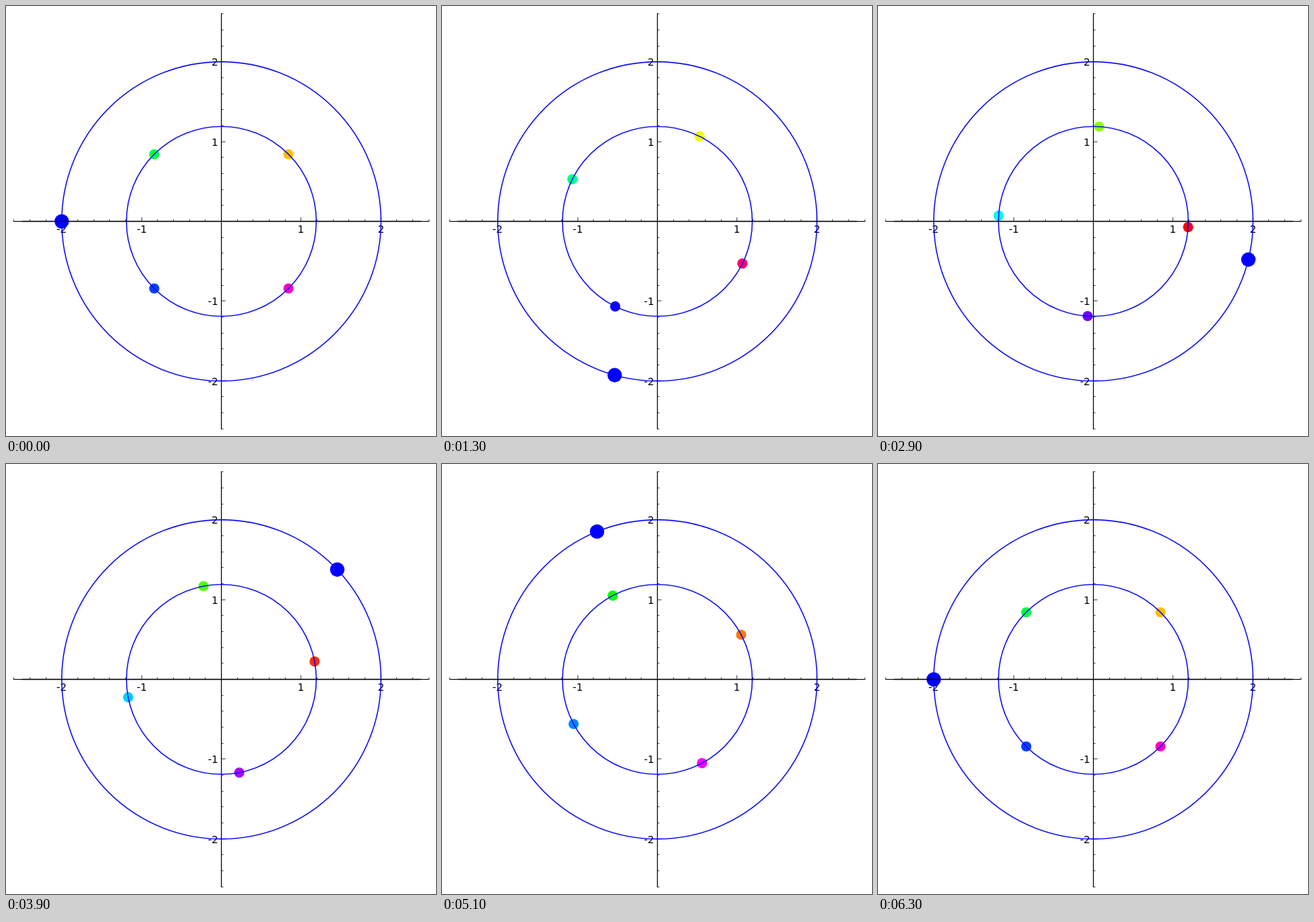
An HTML page with a canvas that plays this animation: 584x584 px, repeating every 7.3 s.

```html
<!DOCTYPE html>
<html lang="en">
<head>
<meta charset="utf-8">
<title>Fourth roots on the complex plane</title>
<style>
  html, body { margin: 0; width: 100%; height: 100%; overflow: hidden; background: #fff; }
  canvas { display: block; width: 584px; height: 584px; }
</style>
</head>
<body>
<canvas id="stage" width="584" height="584"></canvas>
<script>
const ctx = document.getElementById('stage').getContext('2d');
const SIZE = 584, MID = 292.5, UNIT = 108.4;
const PT = 100 / 72; // pixels per point
const STEP_MS = 100, LAST = 63, LOOP_MS = 7300;
const RADIUS = 2, ROOTS = 4, ROOT_RADIUS = RADIUS ** (1 / ROOTS);

const snap = v => Math.floor(v) + 0.5;

function line(x1, y1, x2, y2, width) {
  ctx.lineWidth = width;
  ctx.beginPath();
  ctx.moveTo(x1, y1);
  ctx.lineTo(x2, y2);
  ctx.stroke();
}

function ring(radius) {
  ctx.beginPath();
  ctx.arc(MID, MID, radius * UNIT, 0, 2 * Math.PI);
  ctx.stroke();
}

function dot(radius, angle, size, color) {
  ctx.fillStyle = color;
  ctx.beginPath();
  ctx.arc(MID + radius * UNIT * Math.cos(angle),
          MID - radius * UNIT * Math.sin(angle), size, 0, 2 * Math.PI);
  ctx.fill();
}

function drawAxes() {
  ctx.strokeStyle = ctx.fillStyle = '#000';
  line(10, MID, 575, MID, 0.8 * PT);
  line(MID, 10, MID, 575, 0.8 * PT);
  ctx.font = `${10 * PT}px "DejaVu Sans", sans-serif`;
  ctx.textBaseline = 'alphabetic';
  for (let i = -13; i <= 13; i++) {
    if (i === 0) continue;
    const major = i % 5 === 0;
    const length = (major ? 4 : 2) * PT;
    const x = snap(MID + i / 5 * UNIT), y = snap(MID - i / 5 * UNIT);
    line(x, MID, x, MID - length, 0.5 * PT);
    line(MID, y, MID + length, y, 0.5 * PT);
    if (!major) continue;
    ctx.textAlign = 'center';
    ctx.fillText(i / 5, x, 308);
    ctx.textAlign = 'right';
    ctx.fillText(i / 5, 288, y + 5);
  }
}

function draw(time) {
  const step = Math.min(LAST, Math.floor(time % LOOP_MS / STEP_MS));
  const angle = step === LAST ? Math.PI : -Math.PI + step / 10;
  // The closing pose ends the turn exactly, one root further along.
  ctx.fillStyle = '#fff';
  ctx.fillRect(0, 0, SIZE, SIZE);
  drawAxes();

  dot(RADIUS, angle, Math.sqrt(200) / 2 * PT, '#00f');
  for (let i = 0; i < ROOTS; i++) {
    const root = (angle + 2 * Math.PI * i) / ROOTS;
    const hue = (root * 180 / Math.PI + 360) % 360;
    dot(ROOT_RADIUS, root, 5 * PT, `hsl(${hue}, 100%, 50%)`);
  }

  ctx.strokeStyle = '#00f';
  ctx.lineWidth = PT;
  ring(RADIUS);
  ring(ROOT_RADIUS);
  ctx.strokeStyle = '#000';
  line(MID - 2.5 * UNIT, MID, MID + 2.5 * UNIT, MID, PT);
}

const start = performance.now();
function tick() {
  draw(performance.now() - start);
  requestAnimationFrame(tick);
}
tick();
</script>
</body>
</html>
```
